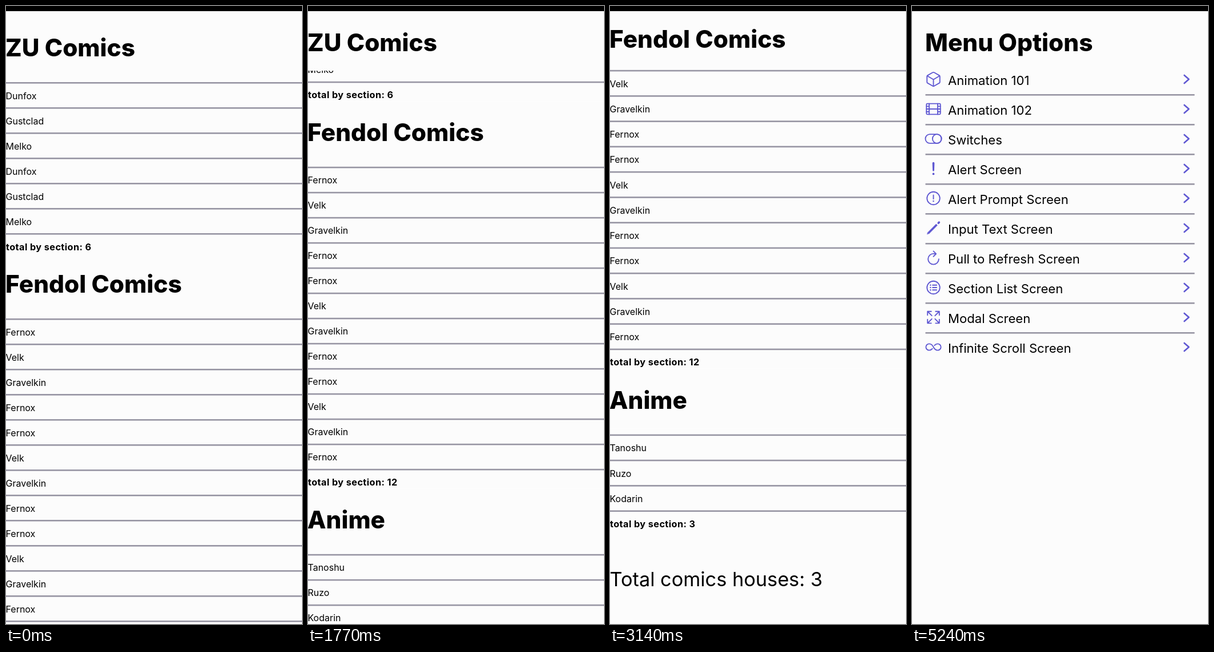
Recreate the animation shown at these times as an HTML page. Size 518 px wide and 1080 px high, loop 5.28 s.

```html
<!DOCTYPE html>
<html lang="en">
<head>
<meta charset="utf-8">
<title>Section list</title>
<style>
  html, body { margin: 0; width: 100%; height: 100%; overflow: hidden; background: #fcfcfc; }
  svg { display: block; }
  text { font-family: Inter, "Open Sans", sans-serif; fill: #000; white-space: pre; }
  .head { font-size: 42.3px; font-weight: 800; }
  .row { font-size: 16px; }
  .sum { font-size: 16.3px; font-weight: 700; letter-spacing: .4px; }
  .foot { font-size: 34.3px; }
  .item { font-size: 22.1px; }
  .rule { fill: #9795a3; }
  .paper { fill: #fcfcfc; }
  .icon { fill: none; stroke: #5f58d2; stroke-width: 32; stroke-linecap: round; stroke-linejoin: round; }
  .icon .solid { fill: #5f58d2; }
</style>
</head>
<body>
<svg id="stage" width="518" height="1080" viewBox="0 0 518 1080">
  <rect class="paper" width="518" height="1080"/>
  <g id="menu"></g>
  <g id="card">
    <rect class="paper" width="518" height="1080"/>
    <g id="list"><g id="content"></g><g id="heads"></g></g>
  </g>
  <rect width="518" height="9"/>
</svg>
<script>
const LOOP = 5280, W = 518, H = 1080, ROW = 44, STUCK = 63, HEAD = 104;
const $ = id => document.getElementById(id);

function add(parent, tag, attrs, label) {
  const el = document.createElementNS('http://www.w3.org/2000/svg', tag);
  for (const k in attrs) el.setAttribute(k, attrs[k]);
  if (label !== undefined) el.textContent = label;
  parent.append(el);
  return el;
}
const text = (parent, cls, x, y, label) => add(parent, 'text', { class: cls, x, y }, label);
const rule = (parent, x, y, width) => add(parent, 'rect', { class: 'rule', x, y: y - 1, width, height: 2.6 });
const repeat = (items, n) => Array.from({ length: n }, () => items).flat();

// Sectioned list: y is the middle of each heading before scrolling
const sections = [
  { title: 'ZU Comics', rows: repeat(['Dunfox', 'Gustclad', 'Melko'], 2) },
  { title: 'Fendol Comics', rows: repeat(['Fernox', 'Velk', 'Gravelkin', 'Fernox'], 3) },
  { title: 'Anime', rows: ['Tanoshu', 'Ruzo', 'Kodarin'] }
];
let y = 73;
for (const s of sections) {
  s.y = y;
  s.el = add($('heads'), 'g', {});
  add(s.el, 'rect', { class: 'paper', y: -54, width: W, height: HEAD });
  text(s.el, 'head', -1, 15.5, s.title);
  const top = y + 61, end = top + s.rows.length * ROW;
  s.rows.forEach((name, i) => {
    rule($('content'), 0, top + i * ROW, W);
    text($('content'), 'row', -.5, top + i * ROW + 28.6, name);
  });
  rule($('content'), 0, end, W);
  text($('content'), 'sum', 0, end + 28.6, 'total by section: ' + s.rows.length);
  y = end + 88;
}
text($('content'), 'foot', -.5, 1486.5, 'Total comics houses: 3');

// Menu: icons are drawn in a 512 unit box
const dot = (x, y, r) => `<circle class="solid" cx="${x}" cy="${y}" r="${r}" stroke="none"/>`;
const path = (d, extra = '') => `<path d="${d}" ${extra}/>`;
const ring = '<circle cx="256" cy="256" r="192"/>';
const items = [
  ['Animation 101', path('M448 341V171Q448 152 432 143L280 55Q256 42 232 55L80 143Q64 152 64 171V341Q64 360 80 369L232 457Q256 470 280 457L432 369Q448 360 448 341ZM69 154L256 264L443 154M256 464V264')],
  ['Animation 102', '<rect x="48" y="96" width="416" height="320" rx="26"/>' +
    path('M128 96V416M384 96V416M128 256H384M48 176H128M48 256H128M48 336H128M384 176H464M384 256H464M384 336H464')],
  ['Switches', '<rect x="16" y="122" width="480" height="268" rx="134"/><circle cx="362" cy="256" r="134"/>'],
  ['Alert Screen', path('M240 96Q240 80 256 80T272 96L264 312Q256 328 248 312Z', 'class="solid"') + dot(256, 416, 32)],
  ['Alert Prompt Screen', ring + path('M256 160V276') + dot(256, 342, 22)],
  ['Input Text Screen', path('M358 154L112 400', 'style="stroke-width:62;stroke-linecap:butt"') +
    path('M405 107L424 88', 'style="stroke-width:62"') + path('M92 380L132 420L72 440Z', 'class="solid" style="stroke-width:10"')],
  ['Pull to Refresh Screen', path('M320 140Q300 134 256 134A160 160 0 1 0 416 294M256 58L336 138L256 218')],
  ['Section List Screen', ring + path('M232 184H352M232 256H352M232 328H352') + dot(168, 184, 20) + dot(168, 256, 20) + dot(168, 328, 20)],
  ['Modal Screen', path('M432 320V432H320M422 422L304 304M80 192V80H192M90 90L208 208M320 80H432V192M422 90L304 208M192 432H80V320M90 422L208 304')],
  ['Infinite Scroll Screen', path('M256 256S208 160 130 160C76 160 32 203 32 256S76 352 130 352C168 352 201 330 224 304M256 256S304 352 382 352C436 352 480 309 480 256S436 160 382 160C344 160 311 182 288 208')]
];
text($('menu'), 'head', 23, 78.5, 'Menu Options');
items.forEach(([label, art], i) => {
  const mid = 128 + i * 52;
  const icon = add($('menu'), 'g', { class: 'icon', transform: `translate(22.5 ${mid - 15}) scale(.0586)` });
  icon.innerHTML = art;
  text($('menu'), 'item', 63, mid + 10, label);
  add($('menu'), 'path', { class: 'icon', style: 'stroke-width:2.6', d: `M476.5 ${mid - 7}l8 7l-8 7` });
  if (i < items.length - 1) rule($('menu'), 23.5, mid + 27, 471);
});

// Motion: [ms, value] keys joined by smooth curves
const scrollKeys = [[0, 0], [580, 62], [1120, 147.5], [1770, 265], [2240, 362], [2400, 430], [2570, 472.5]];
const stretchKeys = [[2780, 0], [3140, .0059], [3310, .0175], [3480, .008], [3640, .002], [3830, 0]];

function curve(keys, t) {
  const last = keys.length - 1;
  if (t <= keys[0][0]) return keys[0][1];
  if (t >= keys[last][0]) return keys[last][1];
  const i = keys.findIndex(k => k[0] > t) - 1;
  const slope = j => j === 0 || j === last ? 0
    : (keys[j + 1][1] - keys[j - 1][1]) / (keys[j + 1][0] - keys[j - 1][0]);
  const [t0, a] = keys[i], [t1, b] = keys[i + 1], d = t1 - t0, u = (t - t0) / d;
  const u2 = u * u, u3 = u2 * u;
  return a * (2 * u3 - 3 * u2 + 1) + b * (3 * u2 - 2 * u3)
    + d * (slope(i) * (u3 - 2 * u2 + u) + slope(i + 1) * (u3 - u2));
}
const part = (t, from, length) => Math.min(1, Math.max(0, (t - from) / length));
const easeOut = u => 1 - (1 - u) ** 4;
const zoom = k => `translate(${W / 2} ${H / 2}) scale(${k}) translate(${-W / 2} ${-H / 2})`;

function draw(t) {
  const scroll = curve(scrollKeys, t);
  $('content').setAttribute('transform', `translate(0 ${-scroll})`);
  sections.forEach((s, i) => {
    const next = sections[i + 1];
    const limit = next ? next.y - scroll - HEAD : Infinity;
    s.el.setAttribute('transform', `translate(0 ${Math.min(limit, Math.max(STUCK, s.y - scroll))})`);
  });

  // Overscroll stretches the list upward from the bottom edge
  const k = 1 + curve(stretchKeys, t);
  $('list').setAttribute('transform', `translate(0 ${H * (1 - k)}) scale(1 ${k})`);

  const leave = easeOut(part(t, 4340, 500));
  const fade = 1 - part(t, 4340, 110);
  $('card').setAttribute('opacity', fade);
  $('card').setAttribute('display', fade ? 'inline' : 'none');
  $('card').setAttribute('transform', zoom(1 - .075 * leave));
  $('menu').setAttribute('transform', zoom(1.075 - .075 * leave));
  $('menu').setAttribute('display', fade < 1 ? 'inline' : 'none');
}

const start = performance.now();
function tick() {
  draw((performance.now() - start) % LOOP);
  requestAnimationFrame(tick);
}
tick();
</script>
</body>
</html>
```
